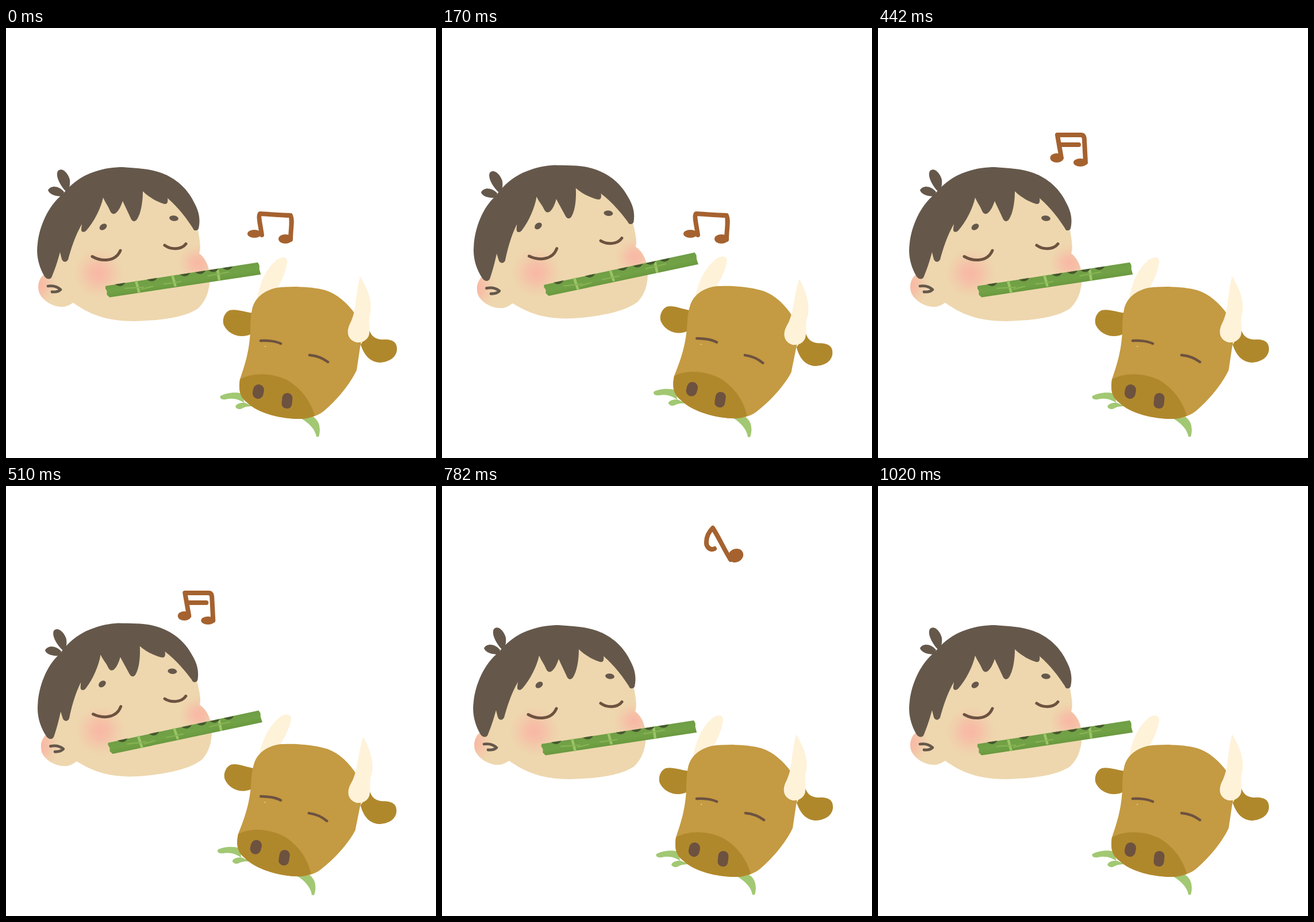
These frames come from a looping animation (748 px wide and 748 px high, 1.15 s). An HTML page:

```html
<!DOCTYPE html>
<html lang="en">
<head>
<meta charset="utf-8">
<title>Flute and cow</title>
<style>
  html, body { margin: 0; width: 100%; height: 100%; overflow: hidden; background: #fff; }
  svg { display: block; width: 100%; height: 100%; }
  .line { fill: none; stroke-linecap: round; stroke-linejoin: round; }
</style>
</head>
<body>
<svg viewBox="0 0 748 748">
  <defs>
    <radialGradient id="blush">
      <stop offset="0" stop-color="#f9b7a4"/>
      <stop offset=".35" stop-color="#f8b9a5" stop-opacity=".75"/>
      <stop offset=".7" stop-color="#f5c2a8" stop-opacity=".35"/>
      <stop offset="1" stop-color="#f2cbab" stop-opacity="0"/>
    </radialGradient>
    <linearGradient id="bamboo" x2="0" y2="1">
      <stop offset="0" stop-color="#6f9e45"/>
      <stop offset=".55" stop-color="#72a246"/>
      <stop offset="1" stop-color="#6a993f"/>
    </linearGradient>
    <path id="face" d="M72 425C60 431 54 443 57 458C61 472 80 486 100 485C108 484 113 480 117 478C145 498 175 510 222 510C275 509 315 502 335 487C348 474 352 460 354 445C356 425 352 405 336 392C340 380 336 365 333 345L300 270H150L90 360Z"/>
    <clipPath id="faceClip"><use href="#face"/></clipPath>
  </defs>

  <g id="boy">
    <use href="#face" fill="#eed7ae"/>
    <g clip-path="url(#faceClip)" fill="url(#blush)">
      <circle cx="161" cy="427" r="46"/>
      <ellipse cx="334" cy="409" rx="38" ry="35"/>
      <ellipse cx="56" cy="446" rx="34" ry="44"/>
    </g>
    <g fill="#65584b">
      <path d="M67 432C57 415 52 395 55 375C58 345 74 308 98 290C111 273 131 257 154 250C171 244 188 242 203 242C225 244 248 244 270 252C298 262 318 283 328 305C337 322 338 335 335 349C332 354 326 353 325 348C316 334 300 312 281 296C282 302 281 307 275 306C262 302 248 294 238 284C238 305 234 325 227 334C223 338 219 336 217 331C212 320 207 310 203 301C200 310 196 318 191 322C187 325 183 323 181 318C178 310 172 303 169 295C165 314 153 337 140 352C135 357 130 355 131 349L132 341C119 364 113 385 108 403C105 408 99 408 97 402L94 390C90 405 85 420 80 432C78 438 71 438 67 432Z"/>
      <path d="M103 283C93 272 86 257 90 249C97 241 108 252 111 264C112 272 110 279 108 284ZM101 285C92 274 78 273 73 282C76 291 90 293 99 293Z"/>
      <ellipse cx="169" cy="346" rx="7" ry="5" transform="rotate(-35 169 346)"/>
      <ellipse cx="292" cy="331" rx="8" ry="4.7" transform="rotate(8 292 331)"/>
    </g>
    <g class="line" stroke="#6d5240" stroke-width="5">
      <path d="M150 397.500C165 406 190 408 199 387M276 378C287 386 305 386 313 375.500"/>
      <path d="M73 449Q86 447 95 455Q90 460 80 459" stroke="#65584b" stroke-width="4.800"/>
    </g>
    <g transform="translate(172 448) rotate(-8.6)">
      <path d="M1 1L269 0L271 5L270 12L271 21.500L5 21.500L1 16L2 10L0 5Z" fill="url(#bamboo)"/>
      <g class="line" stroke="#9cc567" stroke-width="4.500">
        <path d="M55 2L57 20M119 2L121 18M198 3V19"/>
        <path d="M34 10L66 13M62 16L82 14M180 10L216 9M102 13H132" stroke="#88b454" stroke-width="2"/>
      </g>
      <g id="holes" fill="#46582f"/>
    </g>
  </g>

  <g id="cow">
    <path fill="#a2c873" d="M412 636C398 632 382 635 373 640C371 645 376 647 382 646C395 643 405 646 414 652ZM416 652C408 651 400 654 399 659C402 664 408 664 412 661C418 658 424 658 430 658ZM513 679C525 686 538 697 540 711H544C548 698 546 682 532 675Z"/>
    <path fill="#fef2d9" d="M436 478C440 445 452 420 468 406C476 397 490 397 489 407C488 420 480 440 470 456Z"/>
    <g fill="#b0882c">
      <path d="M430 496C415 494 400 488 389 491C378 496 376 510 379 517C385 530 400 537 412 536C420 536 426 532 430 531Z"/>
      <path d="M632 526C636 535 640 541 655 542C670 541 681 545 680 560C679 572 668 581 650 582C635 581 624 572 617 551Z"/>
    </g>
    <path fill="#c49a42" d="M428 490C432 470 448 457 470 452C495 449 530 449 555 456C577 463 594 479 607 497C620 520 620 540 616 555L610 595C599 619 576 647 552 667C540 676 525 680 510 680C480 680 440 671 420 652C407 643 404 630 407 611C416 585 424 560 425 525C425 510 426 498 428 490Z"/>
    <path fill="#b0882c" d="M407 611C430 598 465 600 490 613C515 628 530 650 537 674C528 679 518 680 510 680C480 680 440 671 420 652C407 643 404 630 407 611Z"/>
    <path fill="#fef2d9" d="M616 432C606 470 611 490 598 515C591 530 595 543 610 547C622 548 632 540 632 530C634 518 629 510 634 495C637 475 630 455 616 432Z"/>
    <g fill="#6d5240">
      <rect x="429.500" y="620" width="19" height="25" rx="9.500" transform="rotate(12 439 632)"/>
      <rect x="480" y="635" width="18" height="27" rx="8.500" transform="rotate(6 489 648)"/>
    </g>
    <path class="line" stroke="#6d5240" stroke-width="4.500" d="M443 544C455 543 470 545 478 549M528 569C540 570 552 575 560 581"/>
    <circle cx="451" cy="554" r="1" fill="#eed7ae"/>
  </g>

  <g id="notes" fill="#a5622f" stroke="#a5622f" stroke-width="0">
    <g>
      <path class="line" stroke-width="8" d="M445 360C443 345 438 326 442 323C460 324 480 326 495 326C499 335 495 350 495 368"/>
      <ellipse cx="432" cy="358" rx="12" ry="7"/>
      <ellipse cx="486" cy="367" rx="12" ry="8"/>
    </g>
    <g>
      <path class="line" stroke-width="8" d="M319 226L312 186H353Q359 186 359 195L361 234M316 203H349"/>
      <ellipse cx="311" cy="226" rx="11.500" ry="8"/>
      <ellipse cx="352" cy="234" rx="12" ry="7"/>
    </g>
    <g>
      <path class="line" stroke-width="8" d="M474 109C466 113 459 105 460 97C460 87 466 78 471 73C482 90 491 111 502 128"/>
      <ellipse cx="511" cy="121" rx="13.500" ry="11.500" transform="rotate(-25 511 121)"/>
    </g>
  </g>
</svg>
<script>
  const STEP = 170, LOOP = 1150;
  const byId = id => document.getElementById(id);
  const boy = byId("boy"), cow = byId("cow"), notes = byId("notes");

  byId("holes").innerHTML = [27, 83, 141, 168, 191, 216]
    .map(x => `<path d="M${x - 9} .5H${x + 9}Q${x + 5} 5 ${x} 5T${x - 9} .5Z"/>`).join("");

  // Heads sway between two held poses; each note stays for two beats, then one beat is silent.
  function draw(now) {
    const beat = Math.floor(now % LOOP / STEP);
    const swayed = beat % 2 === 1;
    boy.setAttribute("transform", swayed ? "translate(-21.2 8.6) rotate(-3.3)" : "");
    cow.setAttribute("transform", swayed ? "translate(27.3 -25) rotate(2.8)" : "");
    notes.setAttribute("transform", swayed && beat > 1 ? "translate(-.7 0)" : "");
    [...notes.children].forEach((note, i) => {
      note.style.display = i === beat >> 1 ? "" : "none";
    });
  }

  const start = performance.now();
  function tick() {
    draw(performance.now() - start);
    requestAnimationFrame(tick);
  }
  tick();
</script>
</body>
</html>
```
